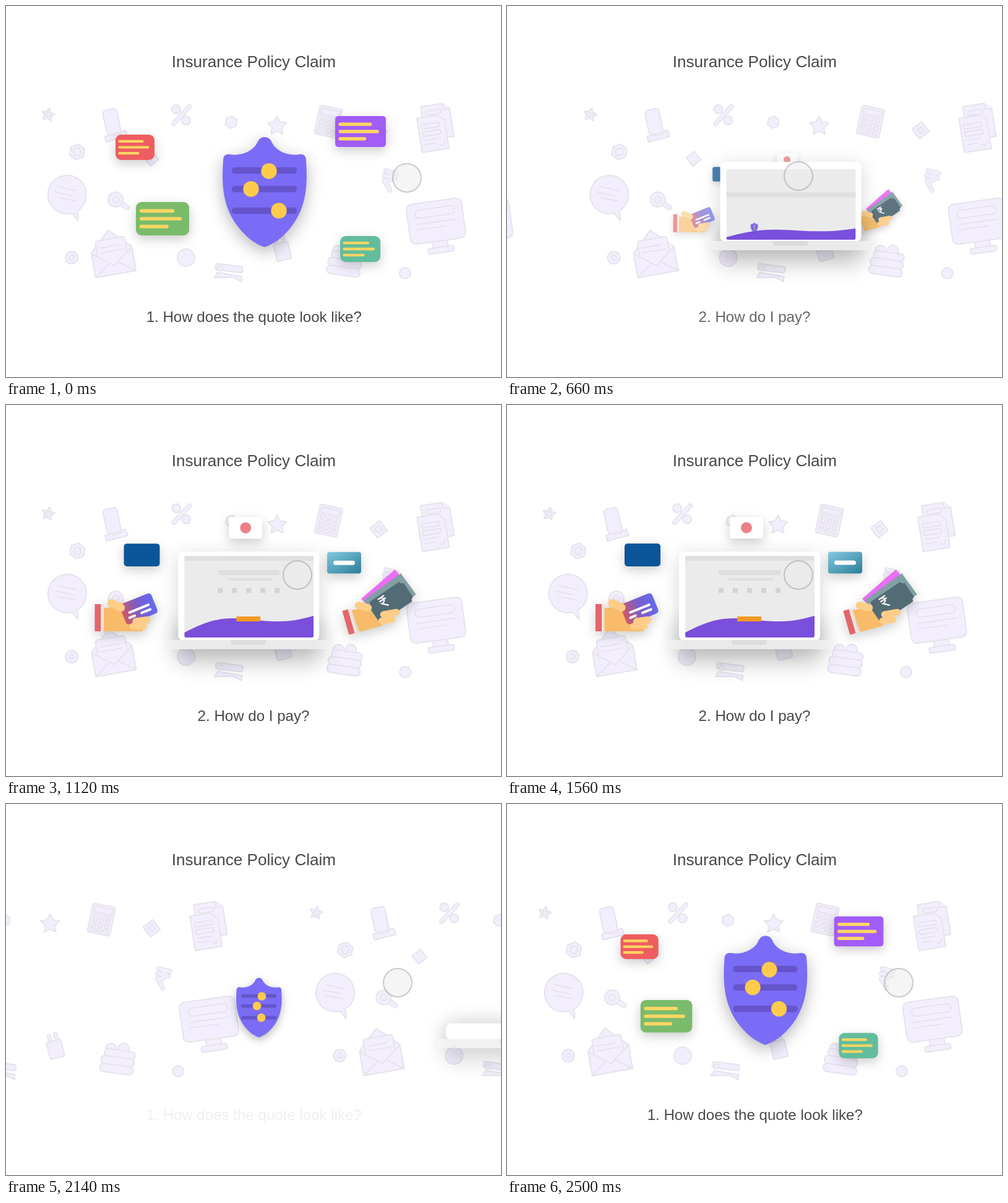
Write an HTML page that moves like this. It is 800 px wide and 600 px high and loops after 2.52 s.

```html
<!DOCTYPE html>
<html lang="en">
<head>
<meta charset="utf-8">
<title>Insurance Policy Claim</title>
<style>
html, body { margin: 0; width: 100%; height: 100%; overflow: hidden; background: #fff; }
svg { display: block; width: 800px; height: 600px; }
text { font-family: "Liberation Sans", Arial, sans-serif; text-anchor: middle; fill: #484848; }
.icon { fill: #f3eefd; stroke: #e6e3ec; stroke-width: 2; stroke-linejoin: round; stroke-linecap: round; }
.soft { filter: drop-shadow(0 6px 9px rgba(0,0,0,.2)); }
.deep { filter: drop-shadow(0 8px 13px rgba(0,0,0,.28)); }
.glow { filter: drop-shadow(0 6px 15px rgba(0,0,0,.16)); }
</style>
</head>
<body>
<svg viewBox="0 0 800 600">
  <defs>
    <g id="tile" class="icon"></g>
    <clipPath id="screenClip"><rect id="clipBox" x="288" width="209" rx="3"/></clipPath>
    <linearGradient id="teal" x1="0" x2="1" y2="1"><stop stop-color="#86cbe0"/><stop offset="1" stop-color="#2a7d9a"/></linearGradient>
    <linearGradient id="pass" x1="0" x2="1"><stop stop-color="#cf5a62"/><stop offset=".5" stop-color="#7c5cc9"/><stop offset="1" stop-color="#626bf0"/></linearGradient>
    <linearGradient id="deck"><stop stop-color="#f3f3f3"/><stop offset=".12" stop-color="#eaeaeb"/><stop offset=".88" stop-color="#eaeaeb"/><stop offset="1" stop-color="#f3f3f3"/></linearGradient>
    <filter id="blur" x="-50%" y="-100%" width="200%" height="300%"><feGaussianBlur stdDeviation="17"/></filter>
  </defs>
  <rect width="800" height="600" fill="#fff"/>
  <g id="scroll"><use href="#tile"/><use href="#tile" x="800"/></g>
  <g id="pay"></g>

  <g id="laptop">
    <rect x="272" y="350" width="240" height="68" rx="20" fill="#000" opacity=".22" filter="url(#blur)"/>
    <rect id="lid" class="glow" x="278" width="228" rx="8" fill="#fff"/>
    <rect id="screen" x="288" width="209" rx="3" fill="#ebebeb"/>
    <g clip-path="url(#screenClip)">
      <rect id="band" x="288" width="209" height="8" fill="#e0e0e0"/>
      <path id="wave" d="M288,0V-8C312,-20 334,-31 365,-31C392,-31 408,-26 440,-26C465,-26 482,-31 497,-35V0Z" fill="#7a4fdb"/>
    </g>
    <g id="items"></g>
    <path d="M257,380H528V386Q526,395 516,395H269Q259,395 257,386Z" fill="url(#deck)"/>
    <path d="M363,380H420V383Q420,388 414,388H369Q363,388 363,383Z" fill="#dcdcdd"/>
  </g>

  <g id="quotes"></g>
  <g id="shield">
    <path class="deep" d="M0,-89C8,-89 10,-84 13,-78C20,-66 38,-58 56,-61C64,-62 67,-58 67,-51C69,-20 70,18 46,52C34,69 18,83 0,89C-18,83 -34,69 -46,52C-70,18 -69,-20 -67,-51C-67,-58 -64,-62 -56,-61C-38,-58 -20,-66 -13,-78C-10,-84 -8,-89 0,-89Z" fill="#7a6cf6"/>
    <path d="M-48,-35H47M-48,-5H47M-48,30H47" stroke="#6554cb" stroke-width="10.5" stroke-linecap="round"/>
    <g id="dots" fill="#ffcb4d"><circle r="12.7" cy="-34"/><circle r="12.7" cy="-5"/><circle r="12.7" cy="30"/></g>
  </g>

  <text x="400.4" y="99" font-size="26.1">Insurance Policy Claim</text>
  <text id="cap1" x="400.8" y="511" font-size="24.1">1. How does the quote look like?</text>
  <text id="cap2" x="400" y="511" font-size="24.1">2. How do I pay?</text>
  <circle id="cursor" r="23" fill="#ececec" fill-opacity=".5" stroke="#8c8c8c" stroke-opacity=".44" stroke-width="2"/>
</svg>
<script>
const $ = id => document.getElementById(id);
const clamp = (v, a = 0, b = 1) => Math.min(b, Math.max(a, v));
const set = (el, attrs) => { for (const k in attrs) el.setAttribute(k, attrs[k]); };
const LOOP = 2520, PAGE = 800;

// ---- markup helpers
const circ = (x, y, r) => `<circle cx="${x}" cy="${y}" r="${r}"/>`;
const rect = (x, y, w, h, r = 0, more = "") =>
  `<rect x="${x - w / 2}" y="${y - h / 2}" width="${w}" height="${h}" rx="${r}" ${more}/>`;
const path = (d, more = "") => `<path d="${d}" ${more}/>`;
const at = (x, y, a, body) => `<g transform="translate(${x} ${y}) rotate(${a})">${body}</g>`;
const tube = (d, w) => path(d, `fill="none" stroke-width="${w + 3}"`) +
  path(d, `fill="none" stroke="#f3eefd" stroke-width="${w}"`);
const ring = (n, radius, turn = 0) => {
  let pts = "";
  for (let i = 0; i < n; i++) {
    const a = (turn + 360 * i / n) * Math.PI / 180, r = radius(i);
    pts += `${(r * Math.sin(a)).toFixed(1)},${(-r * Math.cos(a)).toFixed(1)} `;
  }
  return `<polygon points="${pts}"/>`;
};
const star = r => ring(10, i => i % 2 ? r * .52 : r);
const poly = (n, r, turn) => ring(n, () => r, turn);
const RUPEE = "M-9,-14H9M-9,-6H9M-7,-14C8,-14 8,2 -7,2L5,15";

// ---- pale icons, one page wide
function icons() {
  let keys = "";
  for (let i = 0; i < 12; i++) keys += rect(-10.5 + i % 3 * 10.5, -5 + (i / 3 | 0) * 7.5, 7, 5, 1);
  return at(68, 176, 12, star(11) + circ(0, 0, 3.5)) +
    at(171, 187, -12, rect(0, 0, 23, 40, 5)) + path("M160,211L170,208Q182,212 188,202L193,201L197,211L162,220Z") +
    tube("M271,190L296,163", 5) + circ(275, 167, 7) + circ(291, 185, 7) +
    at(364, 188, 8, poly(6, 10)) +
    at(438, 194, 0, star(16)) +
    at(521, 187, 12, rect(0, 0, 37, 47, 3) + rect(0, -15, 30, 9, 2) + keys) +
    at(602, 201, 8, poly(4, 14) + poly(4, 6)) +
    at(697, 187, -9, path("M-23,-28H12L23,-18V28H-23Z") + path("M12,-28V-18H23") + rect(-4, -16, 24, 7, 3)) +
    at(690, 206, -9, path("M-22,-28H12L22,-18V28H-22Z") + rect(-2, -13, 30, 7, 3) + rect(-2, -1, 30, 7, 3) +
      path("M-15,9H8M-15,16H2M8,19L12,22L18,15", 'fill="none"')) +
    at(115, 236, 10, poly(6, 13) + circ(0, 0, 6)) +
    at(235, 247, 6, poly(4, 12)) +
    path("M107,335L116,347Q118,340 114,332A31,31 0 1 0 98,336Q103,336 107,335Z") +
    path("M84,292L114,299M80,301L108,307M84,310L112,315", 'fill="none"') +
    tube("M184,318L196,326", 6) + circ(177, 313, 12) + circ(177, 313, 5) +
    at(619, 282, 14, tube(RUPEE, 5)) +
    at(695, 349, -8, rect(2, 37, 24, 18, 2) + rect(2, 46, 42, 9, 3) + rect(0, -1, 90, 65, 9) +
      rect(0, -16, 64, 13, 6) + path("M-32,0H32M-32,9H14", 'fill="none"')) +
    at(173, 408, -10, path("M-33,-14L0,-46L33,-14V26H-33Z") + rect(0, -9, 48, 46, 4) +
      path("M-18,-20H12M-18,-12H18", 'fill="none"') +
      path("M-33,-13L0,12L33,-13V26H-33Z") + path("M-33,26L-7,7M33,26L7,7", 'fill="none"')) +
    circ(106, 407, 10) + circ(106, 407, 4) + circ(291, 407, 14) +
    at(360, 430, 7, rect(0, -6, 44, 10, 3) + path("M-22,12L-18,3L22,5V13L8,8Z") + circ(-15, -4, 4)) +
    at(446, 394, -14, rect(-5, -14, 5, 16, 2) + rect(6, -15, 5, 18, 2) + rect(0, 3, 24, 28, 3)) +
    circ(537, 396, 9) + circ(557, 396, 9) +
    at(547, 416, 8, rect(2, -12, 50, 12, 6) + rect(0, 0, 54, 13, 6) + rect(0, 13, 54, 13, 6)) +
    circ(645, 432, 9);
}
$("tile").innerHTML = icons();

// ---- quote cards: start point, meeting point, size, colour
const quotes = [
  [208.5, 228.5, 408, 308, 63, 41, "#ef5d60"],
  [253, 344, 412, 314.5, 86, 54, "#7abb6b"],
  [573, 203, 413, 312, 82, 50, "#a25cf8"],
  [572.5, 393, 413.5, 314, 65, 42, "#62bd9c"]
];
$("quotes").innerHTML = quotes.map(([, , , , w, h, c]) => {
  const line = (y, end) => `M${-w * .4},${y * h}H${end * w}`;
  return `<g class="soft">${rect(0, 0, w, h, w > 80 && h < 52 ? 5 : 9, `fill="${c}"`)}` +
    path(line(-.235, .19) + line(0, .33) + line(.235, .08),
      `stroke="#fdd663" stroke-width="${w * .066}" stroke-linecap="round"`) + "</g>";
}).join("");

// ---- payment cards and hands: place, drift, shrink and fade per scrolled pixel
const line = (d, w) => path(d, `stroke="#fff" fill="none" stroke-width="${w}" stroke-linecap="round"`);
const finger = (x, y, w, h, a) => at(x, y, a, rect(0, 0, w, h, h / 2, 'fill="#fdcd87"'));
const leftHand =
  rect(-45.5, -22, 10, 44, 0, 'fill="#e2666b"') + rect(-38, -22, 5, 44, 0, 'fill="#f3e3da"') +
  path("M-36,-37L-8,-42L12,-20L28,0H-36Z", 'fill="#f8bb69"') +
  at(20.5, -36.5, -22, rect(0, 0, 55, 35, 5, 'fill="url(#pass)"') +
    line("M-16,0H17M-19,8H-10M2,8H17", 4)) +
  finger(-16, -42, 30, 13, 25) + finger(25, -17, 29, 12, -8) + finger(20, -8, 28, 11, -3);
const rightHand =
  at(-47, -21, -16, rect(-3, 0, 10, 40, 0, 'fill="#e2666b"') + rect(4, 0, 5, 40, 0, 'fill="#f3e3da"')) +
  path("M-45,-39L-20,-44L16,-30L4,-14L-32,-4Z", 'fill="#f8bb69"') +
  at(5, -73, -41, rect(0, 0, 72, 22, 0, 'fill="#ea6df3"')) +
  at(17, -60, -36, rect(0, 0, 74, 42, 0, 'fill="#829fa5"')) +
  at(18.5, -53, -34, path("M-29,-19H29Q29,-14 34,-14V14Q29,14 29,19H-29Q-29,14 -34,14V-14Q-29,-14 -29,-19Z", 'fill="#526b75"')) +
  `<g transform="translate(7 -53) rotate(-34) scale(.58)">${line(RUPEE, 4)}</g>` +
  finger(-26, -45, 28, 12, 14) + finger(17, -34, 32, 11, -10) + finger(12, -23, 28, 11, -8);
const pay = [
  [219, 242.5, 1.98, .443, .0054, .004, rect(0, 0, 58, 37, 5, 'fill="#0b5599"')],
  [387, 198.5, .985, .75, .0057, .004, rect(0, 0, 54, 35, 4, 'fill="#fff"') + `<circle r="9" fill="#ec8089"/>`],
  [546.5, 255, -.16, .55, .0058, .004, rect(0, 0, 55, 35, 4, 'fill="url(#teal)"') + line("M-14,0H14", 7)],
  [193.5, 366, 1.63, 0, .0051, .005, leftHand],
  [603.5, 371, -.06, -.06, .0049, .001, rightHand]
];
$("pay").innerHTML = pay.map(p => `<g class="soft">${p[6]}</g>`).join("");

// ---- content on the laptop screen: [x, y, w, h, colour, scroll at which it is gone]
const items = [
  [392, 271, 100, 8, "#dfdfdf", 28],
  [394, 282, 72, 4, "#dfdfdf", 50],
  ...[-2, -1, 0, 1, 2].map(i => [392 + 23 * i, 300, 8, 8, "#d3d3d3", 50]),
  [391.5, 346, 39, 8, "#f29a25", 50]
];
$("items").innerHTML = items.map(([, , w, h, c]) => rect(0, 0, w, h, 1, `fill="${c}"`)).join("");

const place = (el, x, y, s) => {
  el.setAttribute("transform", `translate(${x} ${y}) scale(${Math.max(s, 0)})`);
  el.style.display = s > 0 ? "" : "none";
};

// ---- hand movement, then a critically damped snap to the next page
const DROP1 = 397, GRAB2 = 1700, DROP2 = 2045;
function pointer(t) {
  if (t < GRAB2) {
    return [648 - 177 * clamp(t / DROP1) ** 1.2, 278 - 3 * clamp((t - 370) / 40)];
  }
  const u = clamp((t - GRAB2) / (DROP2 - GRAB2)) ** 2.3;
  return [471 + 162 * u, 275 + 14 * clamp((t - 1920) / (DROP2 - 1920))];
}
const snap = (left, dt) => (left + 7.7 * dt) * Math.exp(-.014 * dt);
function scrolled(t) {
  const x = pointer(t)[0];
  if (t < DROP1) return Math.max(0, 623 - x);
  if (t < GRAB2) return PAGE - snap(PAGE - 152, t - DROP1);
  if (t < DROP2) return PAGE - Math.max(0, x - 500);
  return snap(PAGE - 133, t - DROP2);
}

const sliders = [[7, -16.6, 13.5], [-22, 9.5, -9], [23, -8, 10]];
const slide = ([a, b, c], p) => p < 200 ? a + (b - a) * p / 200 : b + (c - b) * clamp((p - 200) / 200);

function draw(t) {
  const p = scrolled(t), q = PAGE - p, k = p / PAGE;
  set($("scroll"), { transform: `translate(${-p} 0)` });

  place($("shield"), 418 - 20 * k, 301 + 62 * k, 1 - k);
  sliders.forEach((s, i) => set($("dots").children[i], { cx: slide(s, p) }));

  const m = Math.min(p / 250, 1);
  quotes.forEach(([x, y, mx, my], i) =>
    place($("quotes").children[i], x + (mx - x) * m, y + (my - y) * m, 1 - m));

  pay.forEach(([x, y, dx, dy, shrink, fade], i) => {
    const el = $("pay").children[i];
    place(el, x + dx * q, y + dy * q, 1 - shrink * q);
    el.style.opacity = clamp(1 - fade * q);
  });

  const top = 237 + .22 * q + .00012 * q * q, inner = 244 + .3 * q, foot = Math.min(376 + .03 * q, 378);
  set($("laptop"), { transform: `translate(${q} 0)` });
  $("laptop").style.opacity = clamp(1.1 - q / 900);
  set($("lid"), { y: top, height: Math.max(0, 381 - top) });
  for (const id of ["screen", "clipBox"]) set($(id), { y: inner, height: Math.max(0, foot - inner) });
  $("screen").style.opacity = clamp(1.3 - q / 300);
  set($("band"), { y: 244 + .86 * q });
  set($("wave"), { transform: `translate(0 ${foot}) scale(1 ${Math.max(0, 1 - q / 140)})` });
  items.forEach(([x, y, , , , gone], i) => place($("items").children[i], x, y, 1 - q / gone));

  $("cap1").style.opacity = clamp(1 - p / 400);
  $("cap2").style.opacity = clamp(1 - q / 400);
  const [cx, cy] = pointer(t);
  set($("cursor"), { cx, cy });
}

const start = performance.now();
function tick() {
  draw((performance.now() - start) % LOOP);
  requestAnimationFrame(tick);
}
draw(0);
requestAnimationFrame(tick);
</script>
</body>
</html>
```
